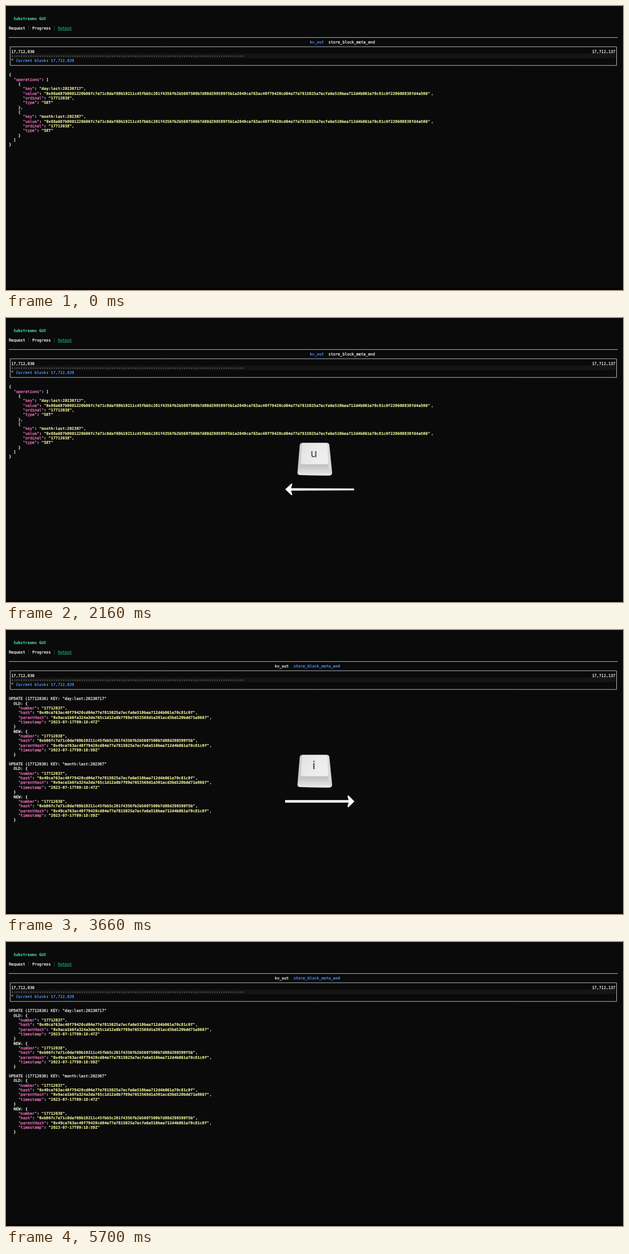
Recreate the animation shown at these times as an HTML page with a canvas. Size 1103x508 px, loop 5.73 s.

```html
<!DOCTYPE html>
<html lang="en">
<head>
<meta charset="utf-8">
<title>Substreams GUI</title>
<style>
html, body { margin: 0; width: 100%; height: 100%; overflow: hidden; background: #0a0a0b; }
canvas { display: block; }
</style>
</head>
<body>
<canvas id="stage" width="1103" height="508"></canvas>
<script>
const ctx = document.getElementById('stage').getContext('2d');

const LOOP = 5730;
const HOLD = 630;
const PRESSES = [[1030, 'i'], [2100, 'u'], [3100, 'i'], [4330, 'u']];
const TURNS = [1090, 2160, 3160, 4390, 5560];

// Terminal grid
const LEFT = 5.2, TOP = 5.9, CELL = 4.17, ROW = 8.346;
const MONO = '6.927px "DejaVu Sans Mono", "Liberation Mono", monospace';
const C = {
  bg: '#0a0a0b', white: '#f6f6f4', rule: '#c8c8c8', dim: '#4a4c4c', dots: '#c4c4c0',
  green: '#3ee09a', teal: '#20a273', blue: '#428df0', pink: '#fb7cc8', yellow: '#f8fda0'
};
const colX = c => LEFT + c * CELL;
const rowY = r => TOP + r * ROW;

// The thin outline gives the slightly heavy look of smoothed terminal type
function text(str, col, row, color = C.white, bold = false) {
  ctx.font = (bold ? 'bold ' : '') + MONO;
  ctx.fillStyle = ctx.strokeStyle = color;
  ctx.lineWidth = bold ? 0.1 : 0.25;
  ctx.fillText(str, colX(col), rowY(row) + 2.5);
  ctx.strokeText(str, colX(col), rowY(row) + 2.5);
}

// Page content
const HASH_OLD = '49ce763ac40f79420cd04e77e7815025a7ecfa6e510bea712d4b061e70c81c0f';
const HASH_NEW = 'b96fc7e71c0daf69b19211c45fbb5c201f4356fb2b5607500b7d88d298599f5b';
const HASH_PARENT = '9ace1b6fa324a3da765c1d12a8b7f89e7653568d1e301acd3bd120bdd71e8667';
const VALUE = '0x08a687b9081220' + HASH_NEW + '1a20' + HASH_OLD + '220608838fd4a506';
const KEYS = ['day:last:20230717', 'month:last:202307'];

function fields(obj, indent) {
  const pad = ' '.repeat(indent);
  return Object.entries(obj).map(([k, v], i, all) =>
    `${pad}"${k}": "${v}"${i < all.length - 1 ? ',' : ''}`);
}

function operation(key, i) {
  const body = fields({ key, value: VALUE, ordinal: '17712038', type: 'SET' }, 6);
  return ['    {', ...body, i ? '    }' : '    },'];
}

function block(label, number, hash, parent, time) {
  const data = {
    number, hash: '0x' + hash, parentHash: '0x' + parent,
    timestamp: `2023-07-17T09:18:${time}Z`
  };
  return [`  ${label}: {`, ...fields(data, 4), '  }'];
}

function update(key) {
  return [
    `UPDATE (17712038) KEY: "${key}"`,
    ...block('OLD', '17712037', HASH_OLD, HASH_PARENT, '47'),
    ...block('NEW', '17712038', HASH_NEW, HASH_OLD, '59'),
    ''
  ];
}

const PAGES = [
  ['{', '  "operations": [', ...KEYS.flatMap(operation), '  ]', '}'],
  KEYS.flatMap(update)
];

function codeLine(line, row) {
  if (line.startsWith('UPDATE')) return text(line, 0, row);
  for (const m of line.matchAll(/("[^"]*")(?=:)|"[^"]*"|[^\s"]+/g)) {
    const word = m[0];
    if (m[1]) text(word, m.index, row, C.pink);
    else if (word[0] === '"') text(word, m.index, row, C.yellow, true);
    else text(word, m.index, row, C.white, !/[A-Z]/.test(word));
  }
}

function header(page) {
  text('Substreams GUI', 2, 2, C.green, true);
  text('Request', 0, 4);
  text('Progress', 10, 4);
  text('Output', 21, 4, C.teal);
  ctx.fillRect(colX(21), 43, 6 * CELL, 0.8);
  ctx.fillStyle = C.dim;
  for (const c of [8, 19]) ctx.fillRect(colX(c + 0.5) - 0.3, 35, 0.7, 8.4);

  ctx.fillStyle = C.rule;
  ctx.fillRect(5, 55.9, 1088.5, 0.9);
  const at = page ? 114 : 129;
  text('kv_out', at, 7, page ? C.white : C.blue, !page);
  text('store_block_meta_end', at + 8, 7, page ? C.blue : C.white, !!page);

  ctx.strokeStyle = C.rule;
  ctx.lineWidth = 0.9;
  ctx.strokeRect(7.5, 72.9, 1084, 33.4);
  ctx.fillStyle = '#151514';
  ctx.fillRect(9.4, 85, 1080, 8.5);
  text('17,712,038', 1, 9);
  text('17,712,137', 250, 9);
  text('·'.repeat(100), 1, 10.05, C.dots);
  text('^', 1, 11);
  text('Current block', 3, 11, C.blue, true);
  text(':', 16, 11, C.white, true);
  text('17,712,038', 18, 11, C.blue, true);
}

// Key cap and arrow
function gradient(x0, y0, x1, y1, ...colors) {
  const g = ctx.createLinearGradient(x0, y0, x1, y1);
  colors.forEach((c, i) => g.addColorStop(i / (colors.length - 1), c));
  return g;
}

function shape(d, fill) {
  ctx.fillStyle = fill;
  ctx.fill(new Path2D(d));
}

function keyCap(letter) {
  shape('M530 223.3H573Q577.5 223.3 578 227L583 276Q583.4 281.8 578 281.8L526 281Q520.8 280.8 521 276L525 228Q525.6 223.3 530 223.3Z',
    gradient(521, 0, 583, 0, '#c4c4c6', '#dededf', '#e6e6e7', '#d2d2d4'));
  shape('M527 261.5H575L580.5 277Q580 281.8 576 281.8L526 281Q521.5 280.5 521.5 276Z',
    gradient(0, 261, 0, 282, '#bdbdbf', '#d3d3d5', '#ececed'));
  shape('M531.5 223.8H571.5Q574.3 223.8 574.5 227L576 257.5Q576 261.5 572 261.5H530.5Q526.6 261.5 527 257.5L528.8 227Q529 223.8 531.5 223.8Z',
    gradient(527, 224, 576, 261, '#e2e2e3', '#ebebec', '#f0f0f1'));
  ctx.fillStyle = '#5b5c62';
  ctx.font = (letter === 'i' ? '600' : '500') + ' 20px Inter, Roboto, sans-serif';
  ctx.textAlign = 'center';
  ctx.fillText(letter, 550.3, 248.6);
  ctx.textAlign = 'left';
}

function arrow(letter) {
  shape(letter === 'i'
    ? 'M499 304.3H612.5L610.4 297.2L612 295.8L622.8 306.5L612 317.2L610.4 315.8L612.5 308.7H499Z'
    : 'M499.2 306.5L510.6 295.8L511.8 297L509.6 304.4L621.5 305Q623.6 306.6 621.5 308.2L509.6 308.8L511.8 316L510.6 317.2Z',
    '#fff');
}

function draw(t) {
  ctx.textRendering = 'geometricPrecision';
  ctx.lineJoin = 'round';
  ctx.fillStyle = C.bg;
  ctx.fillRect(0, 0, 1103, 508);
  ctx.fillStyle = '#030203';
  ctx.fillRect(0, 504.5, 1103, 3.5);

  const page = TURNS.filter(turn => t >= turn).length % 2;
  header(page);
  PAGES[page].forEach((line, i) => codeLine(line, 14 + i));

  const press = PRESSES.find(([at]) => t >= at && t < at + HOLD);
  if (press) {
    keyCap(press[1]);
    arrow(press[1]);
  }
}

const start = performance.now();
function tick() {
  draw((performance.now() - start) % LOOP);
  requestAnimationFrame(tick);
}
tick();
</script>
</body>
</html>
```
